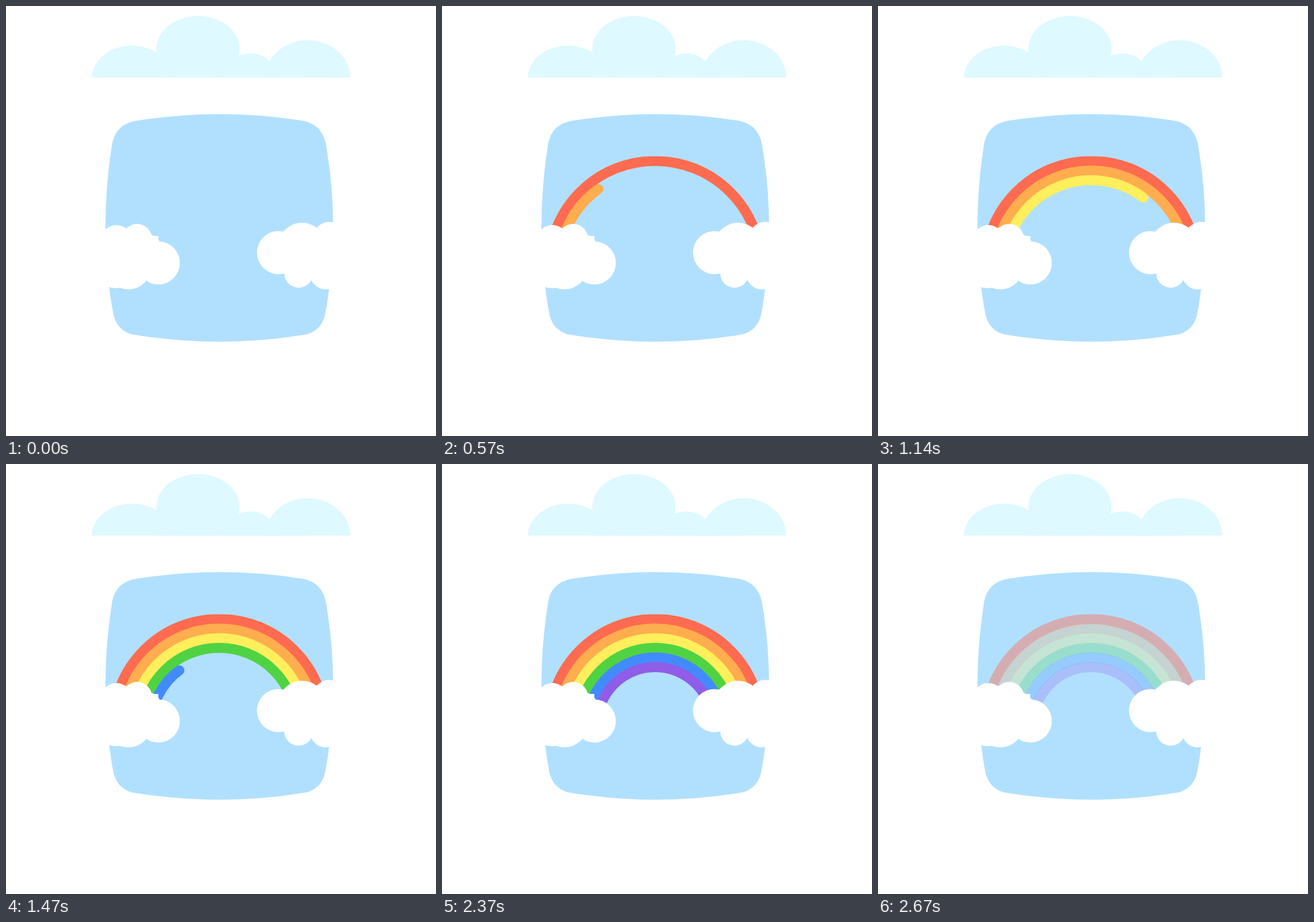
Write an HTML page that moves like this. It is 748 px wide and 748 px high and loops after 2800 ms.

```html
<!DOCTYPE html>
<html lang="en">
<head>
<meta charset="utf-8">
<title>Rainbow</title>
<style>
  html, body { margin: 0; width: 100%; height: 100%; overflow: hidden; background: #fff; }
  svg { display: block; width: 100%; height: 100%; }
</style>
</head>
<body>
<svg viewBox="0 0 748 748">
  <clipPath id="base"><rect width="748" height="124.5"/></clipPath>
  <clipPath id="top"><rect y="261.6" width="748" height="300"/></clipPath>

  <g fill="#def9ff" clip-path="url(#base)">
    <ellipse cx="219" cy="125" rx="69.5" ry="56"/>
    <ellipse cx="334" cy="75" rx="72.5" ry="57.5"/>
    <circle cx="425" cy="130" r="47.5"/>
    <ellipse cx="525" cy="125" rx="74" ry="65.5"/>
    <rect x="262" y="97" width="263" height="28"/>
  </g>

  <path fill="#b1e0ff" d="M185 238Q191 207 224 200Q300 188 371 188Q445 188 518 200Q549 207 556 238
    Q569 310 569 386Q568 470 555 537Q549 563 524 571Q450 584 371 584Q295 584 218 571
    Q193 563 187 537Q173 465 173 386Q173 310 185 238Z"/>

  <g id="rainbow" fill="none" stroke-width="17.4" clip-path="url(#top)"></g>

  <g fill="#fff">
    <circle cx="192" cy="409" r="28"/>
    <circle cx="228" cy="405" r="26"/>
    <circle cx="246" cy="421" r="24"/>
    <circle cx="265" cy="447" r="37.5"/>
    <circle cx="213" cy="453" r="40"/>
    <circle cx="192" cy="451" r="40"/>
    <rect x="165" y="400" width="100" height="70"/>

    <circle cx="474" cy="429" r="37.5"/>
    <circle cx="515" cy="419" r="42"/>
    <circle cx="562" cy="403.5" r="28"/>
    <circle cx="509" cy="465" r="25"/>
    <circle cx="556" cy="466" r="27"/>
    <rect x="485" y="410" width="95" height="60"/>
  </g>
</svg>
<script>
  const LOOP = 2800, CX = 370.7, CY = 454;
  const COLORS = ['#ff6b50', '#ffad4e', '#ffef5c', '#50d342', '#428bff', '#8f5de8'];
  const TIPS = [0, 54, 90.5, 127, 180]; // degrees from the left end
  const rainbow = document.getElementById('rainbow');

  const bands = COLORS.map(color => {
    const band = document.createElementNS('http://www.w3.org/2000/svg', 'path');
    band.setAttribute('stroke', color);
    band.setAttribute('stroke-linecap', 'round');
    return rainbow.appendChild(band);
  });

  function arc(radius, degrees) {
    const a = degrees * Math.PI / 180;
    const x = CX - radius * Math.cos(a), y = CY - radius * Math.sin(a);
    return `M${CX - radius} ${CY}A${radius} ${radius} 0 0 1 ${x} ${y}`;
  }

  function poseAt(t) {
    if (t < 170) return 0;
    if (t < 370) return 1;
    return t < 2040 ? Math.floor((t - 170) / 100) : 19;
  }

  function draw(t) {
    const pose = poseAt(t);
    const alpha = t < 2570 ? 1 : t < 2670 ? 0.5 : 0.25;
    bands.forEach((band, i) => {
      const step = Math.max(0, Math.min(4, pose - 3 * i));
      band.setAttribute('d', step ? arc(184.5 - 16.74 * i, TIPS[step]) : '');
      // the outer band fades more slowly
      band.setAttribute('stroke-opacity', i ? alpha : 1 - (1 - alpha) ** 2);
    });
  }

  let start;
  function tick(now) {
    start ??= now;
    draw((now - start) % LOOP);
    requestAnimationFrame(tick);
  }
  draw(0);
  requestAnimationFrame(tick);
</script>
</body>
</html>
```
